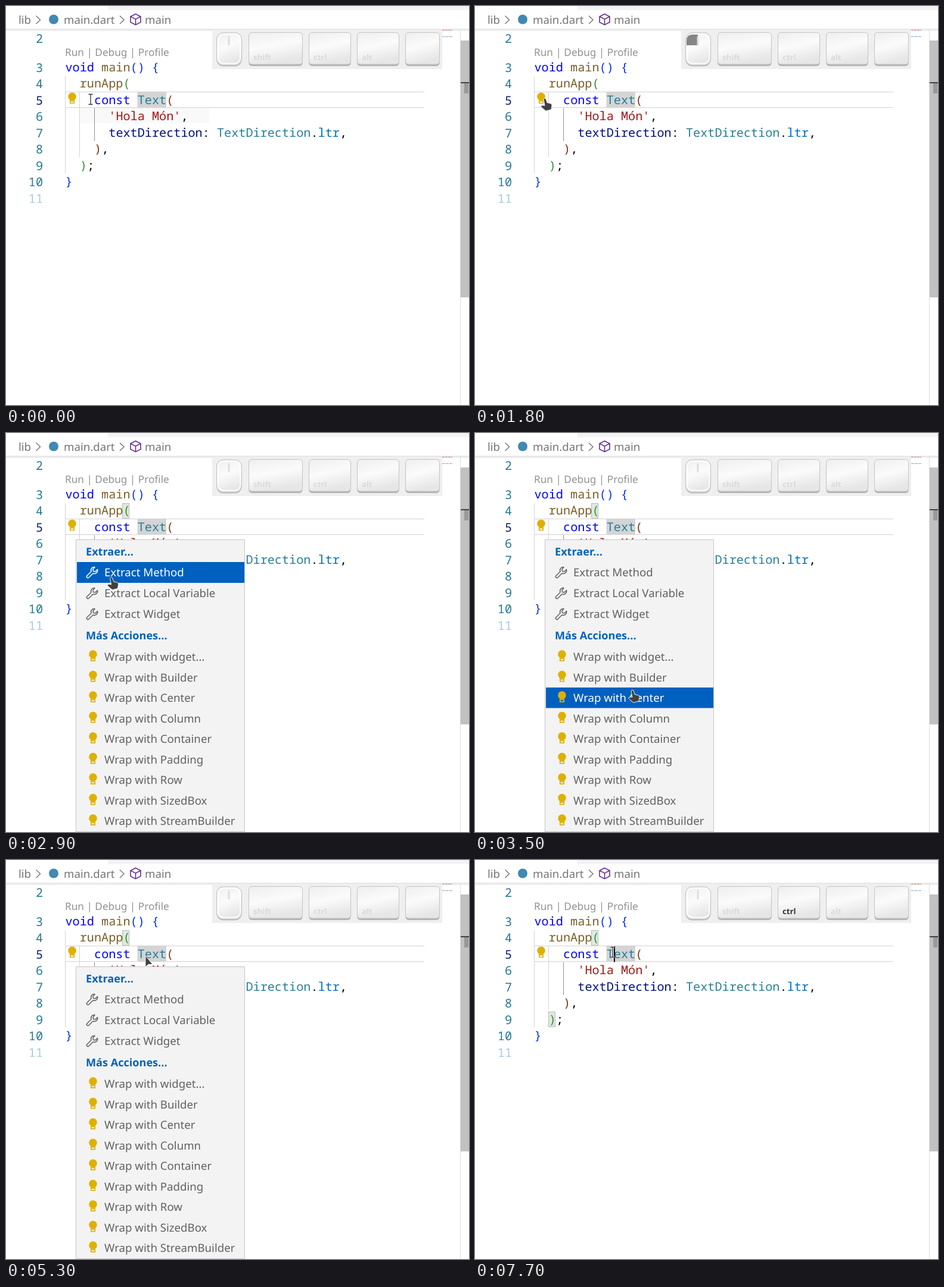
An HTML page for the animation above (8000 ms loop, 777 by 671 pixels).

```html
<!DOCTYPE html>
<html lang="es">
<head>
<meta charset="utf-8">
<title>Code actions</title>
<style>
html, body { margin: 0; width: 100%; height: 100%; overflow: hidden; background: #fff; }
svg { display: block; width: 777px; height: 671px; }
text { font: 18.65px "Noto Sans", sans-serif; white-space: pre; text-rendering: geometricPrecision; }
.code text { font: 20.2px "Noto Sans Mono", monospace; }
.num { text-anchor: end; fill: #237893; }
.crumb { fill: #757575; }
.line { fill: none; stroke: #757575; stroke-width: 1.4; }
.kw, .b1 { fill: #0000ff; } .b1 { fill: #0431fa; } .b2 { fill: #319331; } .b3 { fill: #7b3814; }
.fn { fill: #795e26; } .ty { fill: #267f99; } .st { fill: #a31515; } .pr { fill: #001080; } .co { fill: #0070c1; }
.key text { font-size: 13.2px; font-weight: 700; fill: #dadada; }
.head { font-size: 18.1px; font-weight: 600; fill: #0062bb; }
.item { fill: #616161; }
.item path { fill: none; stroke: #616161; stroke-width: 1.5; stroke-linejoin: round; }
.item.on { fill: #fff; }
.item.on path { stroke: #fff; }
.tip rect { fill: #31363b; }
.tip text { font-size: 12.6px; fill: #eff0f1; }
.cursor { fill: #414141; stroke: #fff; stroke-width: .9; stroke-linejoin: round; }
</style>
</head>
<body>
<svg viewBox="0 0 777 671">
  <defs>
    <linearGradient id="face" x2=".3" y2="1">
      <stop stop-color="#eeeeee"/><stop offset=".5" stop-color="#fbfbfb"/><stop offset="1" stop-color="#e6e6e6"/>
    </linearGradient>
    <linearGradient id="shade" x2="0" y2="1">
      <stop stop-color="#dcdcdc"/><stop offset="1" stop-color="#fff"/>
    </linearGradient>
    <g id="bulb">
      <circle r="6.8" fill="#ddb100"/>
      <path d="M-3.2 4V11.2H3.2V4M-3.2 7.4H3.2" fill="none" stroke="#ddb100" stroke-width="1.7"/>
    </g>
    <path id="wrench" d="M14 1.5a5.5 5.5 0 0 0-6 7.5L1 16a2 2 0 0 0 3 3L11 12a5.5 5.5 0 0 0 7.5-6.5L15 9l-3.5-.5-.5-3z"/>
  </defs>

  <!-- window frame and breadcrumbs -->
  <path d="M171 0H777V7H171z" fill="#f3f3f3"/>
  <path d="M0 38.5H777V43H0z" fill="url(#shade)"/>
  <g class="crumb">
    <text x="21" y="30">lib</text><text x="97" y="30">main.dart</text><text x="233" y="30">main</text>
  </g>
  <path class="line" d="M50.5 16.5l7 6.7-7 6.7M191 16.5l7 6.7-7 6.7"/>
  <circle cx="80" cy="22.5" r="8" fill="#4089b0"/>
  <path class="line" style="stroke:#652d90;stroke-width:1.6" d="M217.5 13.5l8.5 4.3v9.4l-8.5 4.5-8.5-4.5v-9.4zM209 17.8l8.5 4.3 8.5-4.3M217.5 22.1v9.6"/>

  <!-- minimap and scrollbar -->
  <path d="M732 40.5H749" stroke="#c98080" stroke-dasharray="4 1"/>
  <path d="M732 51.5H749" stroke="#86a8c4" stroke-dasharray="5 1"/>
  <path d="M762.5 40V671" stroke="#dcdcdc"/>
  <path d="M763 58H777V490H763z" fill="#c1c1c1"/>
  <path d="M769 130H776V147H769z" fill="#999"/>
  <path d="M763 129H777" stroke="#424242" stroke-width="2"/>

  <!-- editor -->
  <rect id="ghost" x="124" y="171" width="217" height="26" fill="#f9f9f9"/>
  <path d="M99 144.5H702M99 170.8H702" stroke="#dedede" stroke-width="1.5"/>
  <path d="M99.5 118V281M123.5 145V254" stroke="#d3d3d3"/>
  <path d="M148.5 172V227" stroke="#8f8f8f"/>
  <path d="M220.5 144H269V171H220.5z" fill="#d4d4d4"/>
  <g id="match" fill="#e0e9e0" stroke="#b9b9b9">
    <rect x="195.5" y="118.5" width="11" height="25"/><rect x="123.5" y="255.5" width="11" height="25"/>
  </g>
  <text x="99" y="83.5" style="font-size:17.2px" fill="#919191">Run | Debug | Profile</text>
  <g class="code" id="code"></g>
  <use href="#bulb" x="111" y="152.3"/>
  <path id="caret" d="M234 145V171.5" stroke="#000" stroke-width="2"/>

  <!-- key display -->
  <path d="M346 40H732V106H346z" fill="#efefef"/>
  <g class="key" id="keys"></g>
  <rect x="353.5" y="45.5" width="42" height="56" rx="11" fill="#bcbcbc"/>
  <rect x="353.5" y="45" width="42" height="54.5" rx="11" fill="url(#face)" stroke="#c0c0c0"/>
  <rect x="356" y="47.5" width="37" height="49" rx="9" fill="none" stroke="#fff" stroke-width="1.5"/>
  <path id="press" d="M355 66V58Q355 48 365 48H374V66z" fill="#858585"/>
  <path d="M374 52V65" stroke="#dedede" stroke-width="3" stroke-linecap="round"/>

  <g id="menu">
    <rect x="117.5" y="179.5" width="283" height="491" fill="#f3f3f3" stroke="#c6c6c6"/>
    <rect id="select" x="119" width="281" fill="#0060c0"/>
    <text class="head" x="134" y="206">Extraer...</text>
    <text class="head" x="134" y="347">Más Acciones...</text>
  </g>

  <g class="tip" id="tip1"><rect x="128.5" y="170.5" width="221" height="26"/><text x="136" y="188">Mostrar acciones de código (Ctrl+.)</text></g>
  <g class="tip" id="tip2"><rect x="274.5" y="448.5" width="293" height="26"/><text x="282" y="466">Enter para aplicar, Ctrl+Enter para previsualizar</text></g>

  <g class="cursor" id="cursor">
    <path id="arrow" d="M0-1V18L5 13.5H12z"/>
    <path id="hand" d="M-2 2Q-.5-1.5 2 1L4 7.5 10 9Q12.3 9.7 12 12.5L11 19 2 21.5Q-3 18-6.5 14-6 11.5-3 12L0 12.5z"/>
    <g id="beam" fill="none">
      <path d="M-3-8.5H3M-3 8.5H3M0-8.5V8.5" stroke-width="3"/>
      <path d="M-3.5-8.5H3.5M-3.5 8.5H3.5M0-8.5V8.5" stroke="#333" stroke-width="1.3"/>
    </g>
  </g>
</svg>
<script>
const $ = id => document.getElementById(id);
const add = (id, markup) => $(id).insertAdjacentHTML('beforeend', markup);
const show = (id, on) => $(id).setAttribute('opacity', +on);

// Each line: indent, then "class:text" pieces
const lines = [
  [0, 'kw:void ', 'fn:main', 'b1:() {'],
  [2, 'fn:runApp', 'b2:('],
  [4, 'kw:const ', 'ty:Text', 'b3:('],
  [6, "st:'Hola Món'", 'x:,'],
  [6, 'pr:textDirection', 'x:: ', 'ty:TextDirection', 'x:.', 'co:ltr', 'x:,'],
  [4, 'b3:)', 'x:,'],
  [2, 'b2:)', 'x:;'],
  [0, 'b1:}'],
  [0]
];
add('code', '<text class="num" x="62" y="61.5">2</text>');
lines.forEach(([indent, ...parts], i) => {
  const y = 110 + i * 27.45;
  const fill = i == 2 ? '#0b216f' : i == 8 ? '#a7c9d6' : '#237893';
  const spans = parts.map(p => {
    const cut = p.indexOf(':');
    return `<tspan class="${p.slice(0, cut)}">${p.slice(cut + 1)}</tspan>`;
  });
  add('code', `<text class="num" style="fill:${fill}" x="62" y="${y + 1}">${i + 3}</text>
    <text x="${99.5 + indent * 12.13}" y="${y}">${spans.join('')}</text>`);
});

for (const [x, w, label] of [[407.5, 90, 'shift'], [508.5, 70, 'ctrl'], [589.5, 70, 'alt'], [670.5, 57, '']])
  add('keys', `<rect x="${x}" y="46" width="${w}" height="55" rx="5" fill="#b4b4b4"/>
    <rect x="${x}" y="44.5" width="${w}" height="53.5" rx="5" fill="url(#face)" stroke="#c4c4c4"/>
    <text x="${x + 7.5}" y="91">${label}</text>`);
const ctrl = $('keys').querySelectorAll('text')[1];

const names = ['Extract Method', 'Extract Local Variable', 'Extract Widget',
  ...['widget...', 'Builder', 'Center', 'Column', 'Container', 'Padding', 'Row', 'SizedBox', 'StreamBuilder']
    .map(n => 'Wrap with ' + n)];
const rowTop = i => i < 3 ? 217 + i * 35 : 359 + (i - 3) * 34.5;
names.forEach((name, i) => {
  const y = rowTop(i) + 17;
  const icon = i < 3 ? `<use href="#wrench" x="135" y="${y - 10}"/>` : `<use href="#bulb" x="146" y="${y - 4}"/>`;
  // Wrenches are inlined so that row colours reach their outline
  const mark = i < 3 ? `<path transform="translate(135 ${y - 10})" d="${$('wrench').getAttribute('d')}"/>` : icon;
  add('menu', `<g class="item">${mark}<text x="165" y="${y + 7}">${name}</text></g>`);
});
const items = [...document.querySelectorAll('.item')];

const path = [[0, 142, 157], [200, 142, 157], [600, 117, 155], [1800, 117, 155], [2000, 115, 155],
  [2300, 115, 155], [2400, 146, 176], [2600, 146, 176], [3500, 264, 432], [4800, 264, 432],
  [4900, 267, 348], [5300, 234, 162], [5600, 231, 155], [8000, 231, 155]];

function pointer(t) {
  const i = path.findIndex(p => p[0] > t);
  const [t0, x0, y0] = path[i - 1], [t1, x1, y1] = path[i];
  const u = (t - t0) / (t1 - t0);
  const e = t > 4800 ? 1 - (1 - u) ** 2 : u * u * (3 - 2 * u);
  return [x0 + (x1 - x0) * e, y0 + (y1 - y0) * e];
}

// The headings keep the row that was chosen last
function selected(t, y) {
  if (y < 217) return t > 5000 && y < 180 ? -1 : 0;
  if (y > 322 && y < 359) return t > 4000 ? 3 : 2;
  return y < 359 ? Math.min(2, Math.floor((y - 217) / 35)) : 3 + Math.floor((y - 359) / 34.5);
}

// Value of the last step reached
const step = (t, ...steps) => steps.reduce((v, [at, next]) => t >= at ? next : v, 0);
const within = (t, a, b) => t >= a && t < b;

function draw(now) {
  const t = Math.floor(now % 8000 / 100) * 100;
  const [x, y] = pointer(t);
  const open = within(t, 1900, 5600);
  const row = selected(t, y);

  show('ghost', t < 300);
  show('match', t >= 1900);
  show('caret', t >= 5700 && Math.floor((t - 5700) / 500) % 2 == 0);
  show('press', within(t, 1800, 2200) || within(t, 5600, 5900));
  show('menu', open);
  show('select', row >= 0);
  if (row >= 0) {
    $('select').setAttribute('y', rowTop(row));
    $('select').setAttribute('height', row < 3 ? 35 : 34.5);
  }
  items.forEach((item, i) => item.classList.toggle('on', i == row));
  show('tip1', step(t, [1200, .71], [1300, .95], [1700, .5], [1800, 0]));
  show('tip2', step(t, [4000, .9], [4200, .95], [4900, .7], [5000, .3], [5100, 0]));
  ctrl.style.fill = t >= 7700 ? '#333' : t >= 7600 ? '#888' : '';

  const beam = t >= 5600 || t < 600 && x > 122;
  const hand = !beam && (t < 1900 || open && y > 217);
  show('beam', beam);
  show('hand', hand);
  show('arrow', !beam && !hand);
  $('cursor').setAttribute('transform', `translate(${x} ${y})`);
}

const start = performance.now();
function frame() {
  draw(performance.now() - start);
  requestAnimationFrame(frame);
}
frame();
</script>
</body>
</html>
```
